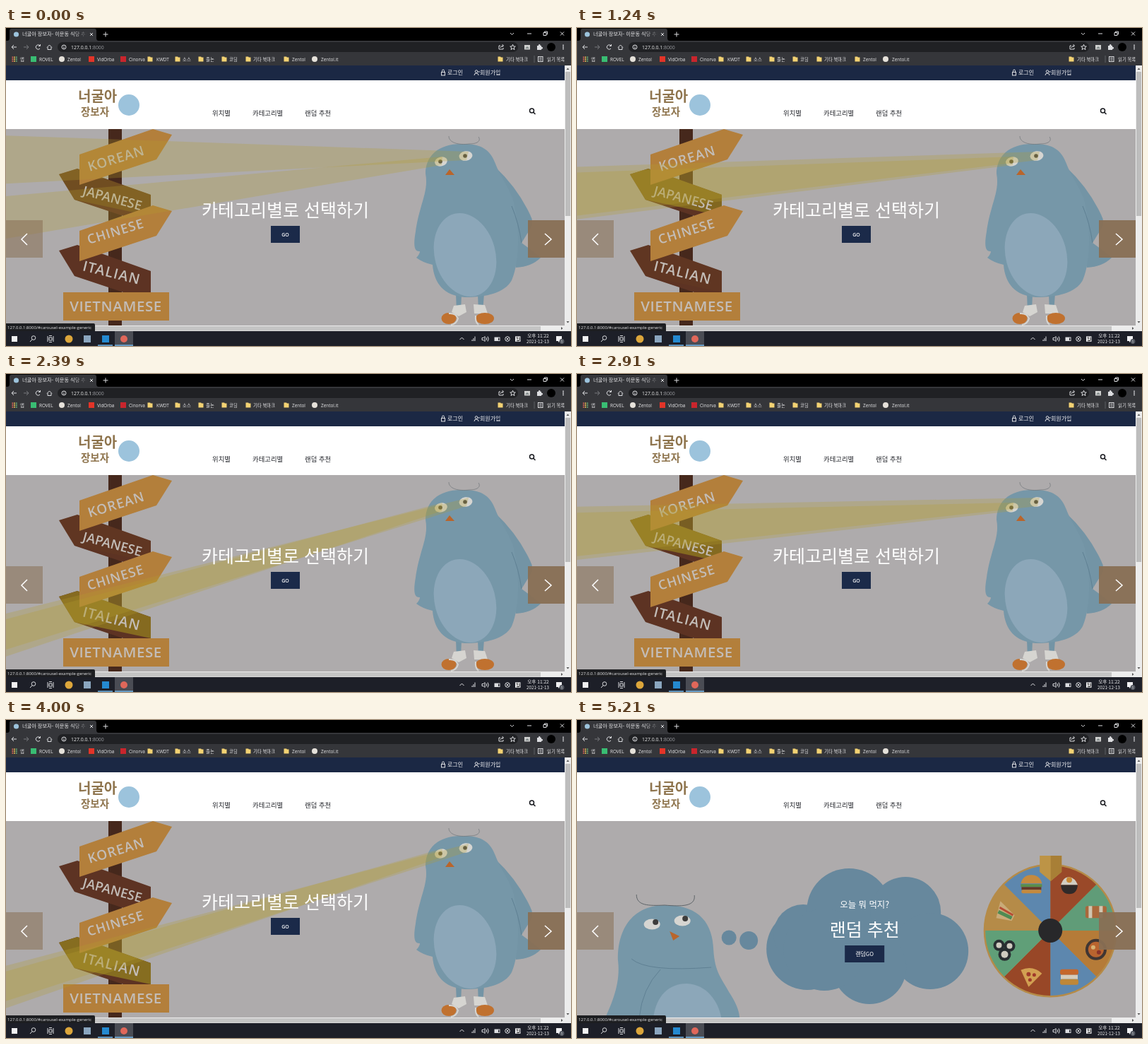
Animation, 800 px wide and 450 px high, one loop 5.24 s. Source, as an HTML page:

```html
<!DOCTYPE html>
<html lang="ko">
<head>
<meta charset="utf-8">
<title>Food finder</title>
<style>
html, body { margin: 0; width: 100%; height: 100%; overflow: hidden; background: #000; }
svg { display: block; width: 800px; height: 450px; font-family: "Open Sans", "Noto Sans CJK KR", "Noto Sans CJK", sans-serif; }
.ko { font-family: "Noto Sans CJK KR", "Noto Sans CJK", sans-serif; }
.mid { text-anchor: middle; }
.line { fill: none; stroke: #dcdde0; stroke-width: 1; }
.sign { font-weight: 600; fill: #c3bdb8; text-anchor: middle; }
</style>
</head>
<body>
<svg viewBox="0 0 800 450">
  <defs>
    <clipPath id="view"><rect y="143" width="791" height="278"/></clipPath>
    <clipPath id="tab"><rect x="20" width="95" height="18"/></clipPath>
    <linearGradient id="fade"><stop offset=".8" stop-color="#35363a" stop-opacity="0"/><stop offset="1" stop-color="#35363a"/></linearGradient>
  </defs>

  <!-- carousel -->
  <g clip-path="url(#view)">
    <rect y="143" width="791" height="278" fill="#aeabac"/>
    <g id="slideA">
      <rect x="145" y="143" width="19" height="278" fill="#46281c"/>
      <g id="signs"></g>
      <g id="bird">
        <path d="M693 197Q724 226 742 264Q748 275 743 283L730 304Q744 314 757 325Q744 338 722 339L704 262Z" fill="#7394a5"/>
        <path d="M637 376L638 402H644L645 376ZM668 376L669 402H675L677 376Z" fill="#7394a5"/>
        <path d="M594 206C594 182 611 164 645 164C672 163 686 172 693 192C699 208 707 217 717 240C728 275 728 330 716 357C706 375 680 381 650 381C621 379 606 362 604 335Q590 332 581 325Q586 320 586 316C577 317 577 305 580 288C585 250 599 232 594 206Z" fill="#7697a8"/>
        <ellipse cx="650" cy="321" rx="43" ry="60" fill="#8ca7b9" transform="rotate(-15 650 321)"/>
        <path d="M716 252Q726 276 730 304" fill="none" stroke="#5f8093"/>
        <path d="M656 164C640 166 627 162 627 153M656 164C667 164 673 160 669 154" fill="none" stroke="#777b7f" stroke-width=".8"/>
        <g fill="#d6d5d1">
          <ellipse cx="616" cy="189" rx="9" ry="6.5" transform="rotate(-14 616 189)"/>
          <ellipse cx="651" cy="181" rx="9.5" ry="6.8" transform="rotate(-8 651 181)"/>
          <path d="M634 393L650 391L652 402L641 408L631 402ZM662 391L678 392L682 404H663Z"/>
        </g>
        <circle cx="615" cy="189" r="2.8" fill="#4b4a48"/><circle cx="650" cy="181" r="2.8" fill="#4b4a48"/>
        <path d="M628 200L622 208L635 208Z" fill="#b9652b"/>
        <ellipse cx="627" cy="411" rx="10.5" ry="8" fill="#c0712f"/><ellipse cx="678" cy="411" rx="13" ry="8" fill="#c0712f"/>
        <path d="M627 404Q637 403 640 411Q638 419 630 420M665 407Q664 416 669 420" fill="none" stroke="#d6d5d1" stroke-width="2"/>
      </g>
      <g fill="#b39a2c" fill-opacity=".27"><path id="beamU"/><path id="beamL"/></g>
      <text class="ko mid" x="395.5" y="266.8" font-size="25" fill="#fff">카테고리별로 선택하기</text>
      <rect x="375" y="280" width="41" height="24" fill="#1b2a49"/>
      <text class="mid" x="395.5" y="294.6" font-size="7" font-weight="600" fill="#fff">GO</text>
    </g>
    <g id="slideB"><g transform="translate(-11)">
      <path d="M40 421C52 395 61 370 58 342C56 308 70 262 125 262C175 262 192 290 193 325C195 358 205 366 215 385Q229 406 230 421Z" fill="#7697a8"/>
      <path d="M108 421C112 390 130 373 155 373C184 374 200 399 204 421Z" fill="#8ca7b9"/>
      <path d="M77 338Q98 357 190 350M88 421Q92 380 118 353" fill="none" stroke="#5f8093"/>
      <path d="M124 262C101 263 84 263 84 247M124 262C148 264 168 264 166 248" fill="none" stroke="#5e6468"/>
      <g fill="#d6d5d1"><ellipse cx="106" cy="289" rx="11.5" ry="7.5"/><ellipse cx="149" cy="284" rx="11.5" ry="7.5"/></g>
      <circle cx="111" cy="286" r="4" fill="#3d3c3b"/><circle cx="153" cy="281" r="4" fill="#3d3c3b"/>
      <path d="M131 299L145 306L136 312Z" fill="#b9652b"/>
      <g id="cloud" fill="#67889d"></g>
      <text class="ko mid" x="407" y="266" font-size="12.4" font-weight="300" fill="#fff">오늘 뭐 먹지?</text>
      <text class="ko mid" x="407" y="305.5" font-size="25" font-weight="500" fill="#fff">랜덤 추천</text>
      <rect x="379" y="319" width="56" height="24" fill="#1b2a49"/>
      <text class="ko mid" x="407" y="333.5" font-size="7.8" font-weight="500" fill="#fff">랜덤GO</text>
      <g id="wheel"></g>
    </g></g>
    <g fill="#896f54"><rect y="272" width="52" height="53" opacity=".55"/><rect x="739" y="272" width="52" height="53" opacity=".94"/></g>
    <path d="M30 291L22 299L30 307M763 291L772 299L763 307" fill="none" stroke="#fff" stroke-width="1.5"/>
  </g>

  <!-- site header -->
  <rect y="53" width="791" height="21" fill="#1b2844"/>
  <rect y="74" width="791" height="69" fill="#fff"/>
  <g class="ko" fill="#f2f2f4" font-size="8"><text x="625" y="66.3">로그인</text><text x="671" y="66.3">회원가입</text></g>
  <g class="line" stroke-width=".8"><rect x="616.5" y="62.5" width="5" height="4.5"/><path d="M617.5 62V60.5A1.5 1.5 0 0 1 620.5 60.5V62M663 67Q663 64 666 64T669 67M668 62H671"/><circle cx="666" cy="61.5" r="1.8"/></g>
  <g class="ko" fill="#8f754e" font-weight="700"><text x="102" y="104" font-size="20">너굴아</text><text x="106" y="124" font-size="14.5">장보자</text></g>
  <circle cx="174" cy="109" r="15" fill="#9cc3dc"/>
  <g class="ko" fill="#23252b" font-size="9.4"><text x="292" y="124">위치별</text><text x="349" y="124">카테고리별</text><text x="423" y="124">랜덤 추천</text></g>
  <g fill="none" stroke="#16181d" stroke-width="1.5"><circle cx="744.5" cy="117" r="3"/><path d="M746.7 119.2L749.5 122"/></g>

  <!-- scroll bars -->
  <path d="M791 53H800V429H0V421H791Z" fill="#ececec"/>
  <rect x="792" y="62" width="7" height="204" fill="#bdbdbd"/><rect x="9" y="422" width="748" height="6.5" fill="#c4c4c4"/>
  <path d="M793.5 59L795.5 56.5L797.5 59ZM793.5 415L795.5 417.5L797.5 415ZM786 423L788.5 425L786 427Z" fill="#555"/>
  <path d="M0 418H124Q126 418 126 420V429H0Z" fill="#1d1e21"/>
  <text x="2" y="425.7" font-size="6.04" fill="#e6e6e8">127.0.0.1:8000/#carousel-example-generic</text>

  <!-- browser -->
  <rect width="800" height="18" fill="#000"/>
  <path d="M2 18Q5 18 5 14V4Q5 1 8 1H125Q128 1 128 4V14Q128 18 131 18Z" fill="#35363a"/>
  <rect y="18" width="800" height="35" fill="#35363a"/>
  <circle cx="14.5" cy="9" r="3.6" fill="#9cc3dc"/>
  <g clip-path="url(#tab)"><text class="ko" x="23" y="11.3" font-size="7.2" fill="#e8e8ea">너굴아 장보자- 이문동 식당 추천</text><rect x="20" width="95" height="17" y="1" fill="url(#fade)"/></g>
  <path class="line" d="M119 7L123 11M123 7L119 11M137.5 9H144.5M141 5.5V12.5M714 7L716.5 9.5L719 7M738 8H744M761 6.5H765V10.5H761ZM762.5 6V5H766.5V9H765.5M785 5.5L790 10.5M790 5.5L785 10.5"/>
  <rect x="73" y="20" width="652" height="14" rx="7" fill="#202124"/>
  <path class="line" d="M15 27H8M11 24L8 27L11 30M48 25A3.2 3.2 0 1 0 48 29M48.5 23V25.5H46M58 27.5L61.5 24L65 27.5M59 27V30.5H64V27"/>
  <path d="M25 27H32M29 24L32 27L29 30" fill="none" stroke="#77787c"/>
  <circle class="line" cx="82" cy="27" r="3"/><path class="line" d="M82 26.5V29M82 25V25.6"/>
  <text x="92" y="29.6" font-size="6.9" fill="#eceded">127.0.0.1<tspan fill="#9a9ca1">:8000</tspan></text>
  <path class="line" stroke-width=".8" d="M700 25H698V30H704V28M700 28Q701 25 704 25M702.5 23L704.5 25L702.5 27M717.5 23.3L718.6 26L721.3 26.1L719.2 27.9L720 30.6L717.5 29L715 30.6L715.8 27.9L713.7 26.1L716.4 26Z"/>
  <rect x="734" y="24" width="8" height="6.5" fill="#cfd0cf"/><path d="M735 29L738 26L741 29Z" fill="#7e8788"/>
  <path d="M752 25H754A1.4 1.4 0 1 1 756.5 25H758V27A1.4 1.4 0 1 1 758 29.5V31H752Z" fill="#dcdde0"/>
  <circle cx="772" cy="27" r="6" fill="#000"/>
  <g fill="#dcdde0"><circle cx="789" cy="24.5" r=".9"/><circle cx="789" cy="27" r=".9"/><circle cx="789" cy="29.5" r=".9"/></g>
  <g id="marks" font-size="6.4" fill="#e8e8ea"></g>
  <path d="M748 39V49" stroke="#5d5e62"/>
  <rect class="line" x="753.5" y="40.5" width="6.5" height="7"/><path class="line" d="M755 42.7H758.5M755 45.2H758.5"/>

  <!-- taskbar -->
  <rect y="429" width="800" height="21" fill="#1d1f28"/>
  <rect x="154" y="429" width="26" height="21" fill="#4a4c54"/>
  <path d="M130 449H151M154 449H180" stroke="#6fb2e6" stroke-width="1.6"/>
  <rect x="8" y="436" width="8" height="8" fill="#f1f1f2"/>
  <circle class="line" cx="39" cy="438.5" r="2.8"/><path class="line" d="M37 440.8L34 444M59 436V444M61 438H65V442H61ZM67 436V444M61 435.5H65M61 444.5H65"/>
  <circle cx="89" cy="440" r="5.5" fill="#dca63b"/><rect x="110" y="435" width="10" height="10" fill="#8ba6bf"/>
  <rect x="136" y="435" width="10" height="10" fill="#2489d0"/><circle cx="167" cy="440" r="5" fill="#e0675a"/>
  <path class="line" d="M642.5 441L645.5 438L648.5 441M660 443V441M662 443V439M664 443V436.5M674 438.5H676L678 436.5V443.5L676 441.5H674ZM680 438Q681.5 440 680 442M682 436.5Q684.5 440 682 443.5"/>
  <rect class="line" x="692" y="438" width="7" height="4.5"/><rect x="692" y="438" width="5" height="4.5" fill="#dcdde0"/>
  <circle class="line" cx="710" cy="440" r="3.3"/><path class="line" d="M708.5 438.5L711.5 441.5M711.5 438.5L708.5 441.5"/>
  <rect x="721" y="436.3" width="7.5" height="7.5" fill="#ececee"/><path d="M722.5 438H725M723 440H725M727 437.5V442M723 442.5H727" stroke="#222"/>
  <g class="ko mid" fill="#f0f0f2"><text x="753.5" y="438" font-size="6.6">오후 11:22</text><text x="753" y="446.2" font-size="6.2">2021-12-13</text></g>
  <path d="M779 436H787V443H784L782 445V443H779Z" fill="#f0f0f2"/><circle cx="787" cy="443.5" r="3.4" fill="#555962"/>
  <text class="mid" x="787" y="445.5" font-size="5" fill="#fff">1</text>
</svg>
<script>
const LOOP = 5240, SWEEP = 1640, WIDTH = 792;
const $ = id => document.getElementById(id);

// Bookmarks: icon x, label x, label, icon colour (folder if none), round
const marks = [
  [39, 47, 'ROVEL', '#39bd73'], [79, 87, 'Zentol', '#e5e1da', 1], [121, 129, 'VidOrba', '#e33428'], [166, 174, 'Cinorva', '#c9252d'],
  [204, 213, 'KWDT'], [243, 250, '소스'], [276, 283, '졸논'], [309, 316, '코딩'], [343, 350, '기타 북마크'],
  [397, 405, 'Zentol'], [437, 446, 'Zentol.it', '#e5e1da', 1], [700, 708, '기타 북마크']
];
const icon = (x, fill, round) =>
  !fill ? `<path d="M${x - 3.5} 40.5H${x}L${x + 1} 41.5H${x + 3.5}V47.5H${x - 3.5}Z" fill="#f3d273"/>`
  : round ? `<circle cx="${x}" cy="44" r="4" fill="${fill}"/>`
  : `<rect x="${x - 4}" y="40" width="8" height="8" fill="${fill}"/>`;
let apps = '';
for (let i = 0; i < 9; i++)
  apps += `<rect x="${8.5 + i % 3 * 2.7}" y="${40.5 + (i / 3 | 0) * 2.7}" width="1.8" height="1.8" fill="${['#df685b', '#e5bd55', '#69ad78'][i % 3]}"/>`;
$('marks').innerHTML = apps + '<text x="20" y="46.5">앱</text><text x="766" y="46.5">읽기 목록</text>' +
  marks.map(([x, tx, label, fill, round]) => icon(x, fill, round) + `<text x="${tx}" y="46.5">${label}</text>`).join('');

// Signposts
const word = (s, x, y, size, turn, gap = 0) =>
  `<text class="sign" x="${x}" y="${y}" font-size="${size}" letter-spacing="${gap}" transform="rotate(${turn} ${x} ${y})">${s}</text>`;
const leftSign = (dy, id, text) => `<g transform="translate(0 ${dy})">
  <path d="M75 207L101 199L205 236V279L97 243Z" fill="#5d3323"/>
  <path id="${id}" d="M75 207L101 199L205 236V266L97 243Z" fill="#8c7420"/>${text}</g>`;
const rightSign = (dy, text) => `<g transform="translate(0 ${dy})">
  <path d="M104 179L208 143L235 151L213 186L104 222Z" fill="#b37f3b"/>${text}</g>`;
$('signs').innerHTML =
  leftSign(0, 'litJ', word('JAPANESE', 149, 247, 18.5, 15)) +
  leftSign(108, 'litI', word('ITALIAN', 148, 245, 20, 14, 1.2)) +
  '<rect x="81" y="374" width="150" height="40" fill="#b37f3b"/>' + word('VIETNAMESE', 155.5, 401, 20.5, 0, .6) +
  rightSign(0, word('KOREAN', 158, 191, 19, -17, 1)) +
  rightSign(108, word('CHINESE', 157, 186, 18.5, -17, .9));

// Thought cloud
$('cloud').innerHTML = [[215, 308, 10.5], [243, 312, 13], [326, 324, 58], [320, 303, 42], [385, 270, 60], [465, 272, 50], [500, 327, 54], [414, 350, 52], [350, 325, 58]]
  .map(([x, y, r]) => `<circle cx="${x}" cy="${y}" r="${r}"/>`).join('');

// Food wheel
const polar = (deg, r) => {
  const a = deg * Math.PI / 180;
  return [670 + r * Math.sin(a), 298 - r * Math.cos(a)].map(v => v.toFixed(1)).join(' ');
};
const foods = [
  '<path d="M-12 0H12Q11 13 0 13T-12 0" fill="#302a29"/><path d="M-12 0Q-8 -12 0 -11T12 0Z" fill="#d2cdc2"/><circle cy="-7" r="4" fill="#c98a35"/>',
  '<rect x="-15" y="-8" width="30" height="17" rx="3" fill="#a9683b"/><path d="M-8 -8V9M7 -8V9" stroke="#d0c6b1" stroke-width="5"/>',
  '<circle r="15" fill="#403633"/><circle r="11" fill="#b9642f"/><circle cx="-4" cy="-3" r="3" fill="#d6b273"/><circle cx="4" cy="4" r="3" fill="#8a3429"/>',
  '<rect x="-13" y="-10" width="26" height="8" rx="3" fill="#c5672c"/><rect x="-12" y="-2" width="24" height="6" fill="#d5ccbc"/><rect x="-13" y="4" width="26" height="8" rx="3" fill="#bf8737"/>',
  '<path d="M-15 -9Q2 -16 15 -4L-4 15Z" fill="#d2a052"/><circle cx="-4" cy="-3" r="3" fill="#a0392b"/><circle cx="4" cy="-2" r="2.5" fill="#a0392b"/><circle cx="-2" cy="5" r="2.5" fill="#a0392b"/>',
  '<g fill="#282e31"><circle cx="-8" cy="-6" r="8"/><circle cx="7" cy="-5" r="8"/><circle cy="7" r="9"/></g><g fill="#cfcbc0"><circle cx="-8" cy="-6" r="4"/><circle cx="7" cy="-5" r="4"/><circle cy="7" r="5"/></g>',
  '<path d="M-12 9L-6 -15L14 5L10 13Z" fill="#c9ab79"/><path d="M-9 0L10 9" stroke="#4f8b53" stroke-width="5"/><path d="M-7 -6L12 5" stroke="#b74c34" stroke-width="3"/>',
  '<path d="M-15 -2Q-12 -14 0 -14T15 -2Z" fill="#c58a3e"/><path d="M-15 1H15" stroke="#5c8e48" stroke-width="4"/><rect x="-14" y="3" width="28" height="4" fill="#683a27"/><rect x="-14" y="7" width="28" height="5" rx="2" fill="#c58a3e"/>'
];
const hues = ['#9a4929', '#609c78', '#b57b38', '#5d87ae', '#984727', '#609f78', '#b58b48', '#5d87ae'];
$('wheel').innerHTML = '<circle cx="670" cy="298" r="94.5" fill="#b58b48"/>' +
  hues.map((h, i) => `<path d="M670 298L${polar(i * 45, 92)}A92 92 0 0 1 ${polar(i * 45 + 45, 92)}Z" fill="${h}"/>`).join('') +
  foods.map((f, i) => `<g transform="translate(${polar(i * 45 + 22.5, 70)})">${f}</g>`).join('') +
  '<circle cx="670" cy="298" r="17" fill="#28282a"/><path d="M655 192H686V215L670.5 228L655 215Z" fill="#bd9446"/><path d="M670.5 192H686V215L670.5 228Z" fill="#a87f36"/>';

// Sweep: time, upper beam edges, lower beam edges at the left side, glow of two signs
const sweep = [
  [0, 152, 220, 238, 298, .4, 0],
  [270, 188, 254, 230, 280, .85, 0],
  [580, 318, 386, 326, 392, 0, .8],
  [720, 348, 398, 356, 408, 0, .9],
  [1270, 188, 258, 196, 263, .85, 0],
  [1570, 136, 193, 238, 296, .4, 0],
  [SWEEP, 152, 220, 238, 298, .4, 0]
];
function sample(t) {
  const i = sweep.findIndex(row => row[0] > t), a = sweep[i - 1], b = sweep[i];
  const k = (t - a[0]) / (b[0] - a[0]);
  return a.map((v, j) => v + (b[j] - v) * k);
}

// cubic-bezier(.42, 0, .58, 1)
function easeInOut(x) {
  if (x <= 0) return 0;
  if (x >= 1) return 1;
  let lo = 0, hi = 1, s;
  for (let i = 0; i < 24; i++) {
    s = (lo + hi) / 2;
    if (1.26 * s * (1 - s) ** 2 + 1.74 * s * s * (1 - s) + s ** 3 < x) lo = s; else hi = s;
  }
  return 3 * s * s - 2 * s ** 3;
}

function draw() {
  const t = performance.now() % LOOP;
  const [, u0, u1, l0, l1, j, i] = sample(t % SWEEP);
  $('beamU').setAttribute('d', `M655 175L0 ${u0}V${u1}L652 187Z`);
  $('beamL').setAttribute('d', `M618 182L0 ${l0}V${l1}L617 194Z`);
  $('litJ').setAttribute('opacity', j);
  $('litI').setAttribute('opacity', i);
  const x = WIDTH * easeInOut((t - 4737) / 518);
  $('slideA').setAttribute('transform', `translate(${-x})`);
  $('slideB').setAttribute('transform', `translate(${WIDTH - x})`);
  requestAnimationFrame(draw);
}
draw();
</script>
</body>
</html>
```
